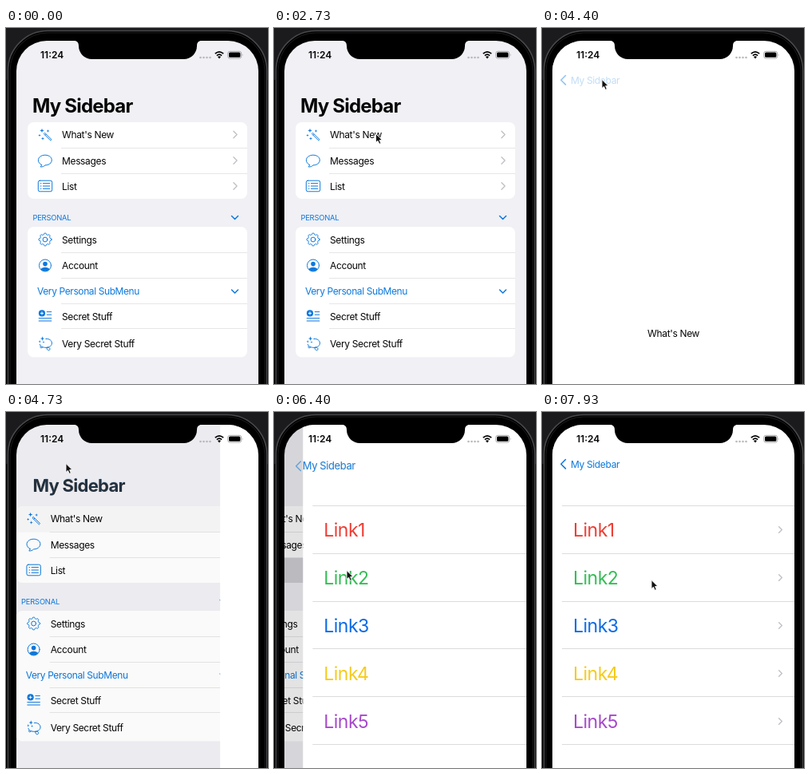
Recreate the animation shown at these times as an HTML page. Size 328x446 px, loop 8000 ms.

```html
<!DOCTYPE html>
<html lang="en">
<head>
<meta charset="utf-8">
<title>My Sidebar</title>
<style>
  html, body { margin: 0; width: 100%; height: 100%; overflow: hidden; background: #000; }
  svg { display: block; width: 100vw; height: 100vh; }
  text { font-family: Inter, "Open Sans", sans-serif; font-size: 12px; letter-spacing: -.35px; fill: #050505; white-space: pre; }
  .blue { fill: #0d79dc; }
  .head { font-size: 9.4px; letter-spacing: -.2px; }
  .large { font-size: 24px; font-weight: 700; letter-spacing: -.8px; }
  .link { font-size: 23px; letter-spacing: -.5px; }
  .clock { font-weight: 600; letter-spacing: 0; }
  .sep { stroke: #dcdcdf; stroke-width: 1; }
  .faint { stroke: #e6e6e9; stroke-width: 1; }
  .line { fill: none; stroke: #0d79dc; stroke-width: 1; stroke-linecap: round; stroke-linejoin: round; }
  .chev { fill: none; stroke: #bfbfc4; stroke-width: 1.3; stroke-linecap: round; stroke-linejoin: round; }
  .bold { stroke: #0d79dc; stroke-width: 1.5; }
</style>
</head>
<body>
<svg id="stage" viewBox="0 0 328 446" preserveAspectRatio="none"></svg>
<script>
const LOOP = 8000, LEFT = 13, WIDTH = 303;
const stage = document.getElementById('stage');

const text = (x, y, s, cls = '', extra = '') => `<text x="${x}" y="${y}" class="${cls}" ${extra}>${s}</text>`;
const path = (d, cls = 'line', extra = '') => `<path d="${d}" class="${cls}" ${extra}/>`;
const sep = (x1, x2, y, cls = 'sep') => path(`M${x1} ${y}H${x2}`, cls);
const rect = (x, y, w, h, fill, extra = '') => `<rect x="${x}" y="${y}" width="${w}" height="${h}" fill="${fill}" ${extra}/>`;
const at = (x, y, s) => `<g transform="translate(${x} ${y})">${s}</g>`;
const right = (x, y, h = 4) => path(`M${x - h / 2} ${y - h}l${h} ${h}l${-h} ${h}`, 'chev');
const down = (x, y) => path(`M${x - 4} ${y - 2}l4 4l4 -4`, 'chev bold');
// outline open at the bottom with round upper corners
const shell = (x1, y, x2, r) => `M${x1} 450V${y + r}A${r} ${r} 0 0 1 ${x1 + r} ${y}H${x2 - r}A${r} ${r} 0 0 1 ${x2} ${y + r}V450`;
const spark = (x, y, r) => {
  const k = r * .25;
  return path(`M${x} ${y - r}L${x + k} ${y - k}L${x + r} ${y}L${x + k} ${y + k}L${x} ${y + r}L${x - k} ${y + k}L${x - r} ${y}L${x - k} ${y - k}Z`, 'blue');
};

function gear() {
  let d = '';
  for (let i = 0; i <= 96; i++) {
    const a = i / 96 * Math.PI * 2;
    const r = 7.1 + .8 * Math.tanh(2.5 * Math.cos(8 * a));
    d += (i ? 'L' : 'M') + (r * Math.cos(a)).toFixed(2) + ' ' + (r * Math.sin(a)).toFixed(2);
  }
  return path(d + 'Z') + '<circle r="2.9" class="line"/>';
}

const icons = {
  wand: spark(-4, -5, 2.8) + spark(-7, 1, 1.7) + spark(-3, 5, 2.2) + spark(3.5, -4.5, 2)
    + path('M-1.4 -1.2L-.4 -2.1L8 6.2L7 7.1Z') + path('M.4 .6L1.3 -.3'),
  bubble: path('M-4.6 5.4C-10 2.6 -9.8 -3 -5.2 -5.6C-1 -7.8 5.4 -7 7.6 -3.2C9.8 1 6.4 5.9 0 5.9C-1.6 7.4 -3.6 8.2 -5.8 8C-4.9 7.2 -4.6 6.4 -4.6 5.4Z'),
  list: '<rect x="-8.7" y="-6.8" width="17.4" height="13.6" rx="2" class="line"/>'
    + [-3.4, 0, 3.4].map(y => path(`M-5.6 ${y}h.6M-2.6 ${y}H5.8`)).join(''),
  gear: gear(),
  person: '<circle r="7.5" class="line"/><circle cy="-1.9" r="2.8" class="blue"/>'
    + path('M-5.6 4.7C-4.2 1.3 4.2 1.3 5.6 4.7C3 8 -3 8 -5.6 4.7Z', 'blue'),
  badge: '<circle cx="-4" cy="-3.6" r="4.1" class="blue"/>'
    + path('M-6 -3.6h4M-4 -5.6v4', '', 'stroke="#fff" stroke-width="1"')
    + path('M2.2 -5.4H7.8M2.2 -1.8H7.8M-7.8 2.6H7.8M-7.8 6H7.8'),
  lasso: spark(-3.4, -6.4, 2.8) + spark(-6.8, -2.6, 1.8) + spark(-2, -1.8, 1.5)
    + path('M.8 -6C5.4 -6.6 8.6 -3.8 8.4 -.4C8.2 3.4 4 5.2 -.4 4.8C-4 4.4 -6.6 3 -6.6 .8')
    + path('M-5.6 3C-7.2 5 -5 6.4 -3.2 4.4M2.2 4.8C4.8 4 7 6 5.6 7.8C4.2 9.2 1.4 7.6 2.2 4.8Z')
};

const rows = [
  ['wand', "What's New", 133.5], ['bubble', 'Messages', 166], ['list', 'List', 198],
  ['gear', 'Settings', 265], ['person', 'Account', 297.5],
  ['badge', 'Secret Stuff', 361], ['lasso', 'Very Secret Stuff', 395.5]
];
const links = ['#ef3d34', '#34be55', '#0b6be6', '#f5cb1e', '#a64acb'];

const menu = rect(LEFT, 16, WIDTH, 430, '#f0f0f5')
  + rect(27, 118, 275, 96, '#fff', 'rx="8"') + rect(27, 249, 275, 163.5, '#fff', 'rx="8"')
  + `<g clip-path="url(#card)">${rect(27, 118, 275, 32.5, '#d1d1d6', 'id="hit0"')}${rect(27, 182.5, 275, 32, '#d1d1d6', 'id="hit1"')}</g>`
  + [150.5, 182.5, 281.5, 313.5, 345.5, 376.5].map(y => sep(69, 302, y, 'faint')).join('')
  + rows.map(([icon, label, y], i) => at(49, y, icons[icon]) + text(70, y + 4.5, label)
    + (i < 3 ? right(287, y, 4.2) : '')).join('')
  + text(33.4, 240.7, 'PERSONAL', 'blue head') + down(286.5, 237.5)
  + text(39, 334, 'Very Personal SubMenu', 'blue', 'style="letter-spacing:-.4px"') + down(286.5, 330);

const news = text(164.6, 386.8, "What's New", '', 'text-anchor="middle"');
const linkList = links.map((c, i) => text(39, 156 + 60 * i, 'Link' + (i + 1), 'link', `style="fill:${c}"`)
  + right(298.5, 147.5 + 60 * i, 3.8)).join('')
  + [0, 1, 2, 3, 4, 5].map(i => sep(25, 316, 117.5 + Math.round(59.8 * i))).join('');

const status = text(43, 38.3, '11:24', 'clock')
  + [244, 248, 252, 256].map(x => `<circle cx="${x - .5}" cy="37" r="1.3" fill="#b9b9bd"/>`).join('')
  + path('M261.8 32.2Q267 27.6 272.2 32.2M263.9 34.6Q267 31.8 270.1 34.6', '', 'fill="none" stroke="#000" stroke-width="1.7"')
  + path('M265 36Q267 34.4 269 36L267 38.4Z', '')
  + '<rect x="277.7" y="29.3" width="17" height="8.8" rx="2.6" fill="none" stroke="#a0a0a4" stroke-width=".9"/>'
  + rect(279, 30.6, 14.4, 6.2, '#000', 'rx="1.5"') + path('M295.8 32.2q1.5 1.5 0 3z', '', 'fill="#a0a0a4"');

stage.innerHTML = `<defs>
    <clipPath id="screen"><path d="${shell(LEFT, 16, LEFT + WIDTH, 38)}Z"/></clipPath>
    <clipPath id="card"><rect x="27" y="118" width="275" height="96" rx="8"/></clipPath>
  </defs>`
  + rect(0, 0, 328, 446, '#000') + rect(0, 0, 328, 65, '#1b1b1e')
  + path(shell(2.5, 3.5, 326.5, 50), '', 'fill="#000" stroke="#48484b" stroke-width="1.6"')
  + path(shell(5, 6, 324, 47.5), '', 'fill="#000" stroke="#1d1d1f"')
  + `<g clip-path="url(#screen)">
      <g id="menu">${menu}</g>
      ${rect(LEFT, 16, WIDTH, 430, '#000', 'id="dim"')}
      <g id="detail">${rect(LEFT, 16, WIDTH, 430, '#fff')}<g id="news">${news}</g><g id="links">${linkList}</g></g>
      <g id="title">${text(0, 0, 'My Sidebar', 'large')}</g>
      <g id="back">${text(0, 0, 'My Sidebar', 'blue')}</g>
      <g id="arrow">${path('M29.5 59.5L23.8 65.2L29.5 70.9', 'chev bold')}</g>
      ${status}
    </g>`
  + path('M84 15.5C89 16 91 18 91 22.5A16.5 16.5 0 0 0 107.5 39H222.5A16.5 16.5 0 0 0 239 22.5C239 18 241 16 246 15.5Z', '', 'fill="#000"')
  + `<g id="cursor">${path('M0 0V11L2.5 8.8L4.3 12.8L6.3 12L4.6 8H8Z', '', 'fill="#111" stroke="#fff" stroke-width=".9" stroke-linejoin="round"')}</g>`;

const el = {};
stage.querySelectorAll('g[id], rect[id]').forEach(n => el[n.id] = n);
const set = (id, name, v) => el[id].setAttribute(name, v);
const fade = (id, v) => set(id, 'opacity', clamp(v).toFixed(3));
const clamp = v => Math.max(0, Math.min(1, v));
const mix = (a, b, p) => a + (b - a) * p;

// critically damped spring, time in ms
function spring(t) {
  if (t <= 0) return 0;
  const w = t * .01826;
  return w > 9.5 ? 1 : 1 - (1 + w) * Math.exp(-w);
}

// time, x, y of the pointer tip
const track = [
  [730, 241, 386], [1100, 61, 290], [1530, 220, 171], [1700, 220, 171], [2400, 127.5, 132.5],
  [3670, 127.5, 132.5], [4250, 75, 64.5], [4900, 75, 64.5], [5330, 130, 121], [5520, 281, 172],
  [5760, 44, 221], [5930, 91, 198.5], [6600, 91, 198.5], [6930, 44, 270], [7070, 44, 270],
  [7270, 70, 381], [7480, 157, 300], [7670, 137, 210.5], [8000, 137, 210.5]
];
function pointer(t) {
  let i = 0;
  while (i < track.length - 2 && t >= track[i + 1][0]) i++;
  const [a, b] = [track[i], track[i + 1]];
  const k = clamp((t - a[0]) / (b[0] - a[0])), e = k * k * (3 - 2 * k);
  return [mix(a[1], b[1], e), mix(a[2], b[2], e)];
}

function draw(t) {
  const second = t > 5400;
  const p = second ? spring(t - 6170) : spring(t - 2830) - spring(t - 4550);
  const off = WIDTH * (1 - p);

  set('menu', 'transform', `translate(${-.3 * WIDTH * p} 0)`);
  set('detail', 'transform', `translate(${off} 0)`);
  set('detail', 'visibility', p > 0 ? 'visible' : 'hidden');
  fade('dim', .12 * p);
  fade('news', second ? 0 : 1);
  fade('links', second ? 1 : 0);
  fade('hit0', t > 2770 && t < 4550 ? 1 : second ? 0 : p);
  fade('hit1', t > 6130 ? 1 : 0);

  // the large title shrinks into the back label
  const x = mix(33, 36, p), y = mix(105.8, 69.6, p);
  set('title', 'transform', `translate(${x} ${y}) scale(${mix(1, .488, p)})`);
  set('back', 'transform', `translate(${x} ${y}) scale(${mix(2.05, 1, p)})`);
  set('arrow', 'transform', `translate(${50 * (1 - p)} ${33 * (1 - p)})`);
  const press = t > 4300 && t < 4550 ? 1 - .75 * clamp((t - 4300) / 60) : 1;
  fade('title', 1 - p);
  fade('back', p * press);
  fade('arrow', (p - .83) / .17 * mix(.45, 1, (press - .25) / .75));

  const [cx, cy] = pointer(t);
  set('cursor', 'transform', `translate(${cx} ${cy})`);
  set('cursor', 'visibility', t >= 730 ? 'visible' : 'hidden');
}

const start = performance.now();
function tick() {
  draw((performance.now() - start) % LOOP);
  requestAnimationFrame(tick);
}
tick();
</script>
</body>
</html>
```
